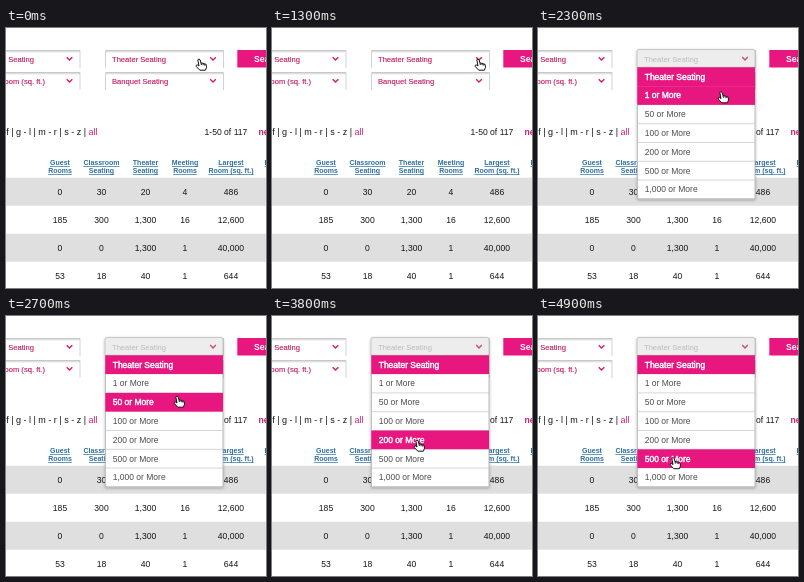
Write an HTML page that moves like this. It is 260x260 px and loops after 5000 ms.

```html
<!DOCTYPE html>
<html lang="en">
<head>
<meta charset="utf-8">
<title>Seating filter</title>
<style>
  html, body { margin: 0; width: 100%; height: 100%; overflow: hidden; background: #fff; }
  svg { display: block; width: 100vw; height: 100vh; }
  text { font: 8.6px "Liberation Sans", Arial, sans-serif; fill: #151515; }
  .label { font-size: 7.6px; fill: #c4145f; stroke: #c4145f; stroke-width: .12px; }
  .dim { fill: #bbb; stroke: none; }
  .head { font-size: 7px; font-weight: bold; fill: #2d6f9f; text-decoration: underline; }
  .mid { text-anchor: middle; }
  .end { text-anchor: end; }
  .item { font-size: 8.5px; fill: #4c4c4c; }
  .on { fill: #fff; stroke: #fff; stroke-width: .45px; }
  .strong { font-weight: bold; fill: #d51b73; }
  .go { font-weight: bold; fill: #fff; }
</style>
</head>
<body>
<svg id="stage" viewBox="0 0 260 260">
  <defs>
    <linearGradient id="inset" x2="0" y2="1">
      <stop stop-color="#bdbdbd"/><stop offset="1" stop-color="#fff"/>
    </linearGradient>
    <filter id="shade" x="-10%" y="-10%" width="120%" height="125%">
      <feDropShadow dx="0" dy="1" stdDeviation="1.5" flood-opacity=".3"/>
    </filter>
  </defs>
  <rect width="260" height="260" fill="#fff"/>
  <g id="page"></g>
  <g id="menu"></g>
  <g id="cursor" stroke-linejoin="round">
    <path id="hand" fill="#fff" stroke="#111" stroke-width="1"
      d="M-1.2 .8Q0-.8 1.1.8L2 4.2Q3.2 3.4 3.9 4.5Q5.2 3.8 5.7 5Q7.2 4.6 7.3 6.2L7.5 8.3L6.4 11.2H.8L-2.8 7.4Q-3.2 5.8-1.6 5.9L0 7Z M2 4.2L2.4 6 M3.9 4.5L4.3 6.2 M5.7 5L5.9 6.6"/>
    <path id="arrow" fill="#222" stroke="#fff" stroke-width=".7"
      d="M0 0V9.2L2.2 7.2L3.9 10.6L5.6 9.8L4 6.6H6.8Z"/>
  </g>
</svg>
<script>
const $ = id => document.getElementById(id);
const text = (x, y, s, cls = '') => `<text x="${x}" y="${y}" class="${cls}">${s}</text>`;
const rect = (x, y, w, h, fill, more = '') =>
  `<rect x="${x}" y="${y}" width="${w}" height="${h}" fill="${fill}" ${more}/>`;
const line = (d, color, width = .8) =>
  `<path d="${d}" fill="none" stroke="${color}" stroke-width="${width}"/>`;
const chevron = (x, y, color) => line(`M${x - 2.8} ${y - 1.4}l2.8 2.8l2.8-2.8`, color, 1.4);
const pink = '#e8177f', grey = '#dfdfdf';

const select = (x, y, tx, label, cls = '') =>
  rect(x, y - .5, 118, 3, 'url(#inset)') +
  line(`M${x} ${y}V${y + 17.5}M${x + 118} ${y}V${y + 17.5}`, '#c8c8c8') +
  text(tx, y + 11.2, label, 'label ' + cls) + chevron(x + 107.5, y + 8.2, '#d51b73');

const columns = [
  [54, 'Guest', 'Rooms', '0', '185', '0', '53'],
  [95.5, 'Classroom', 'Seating', '30', '300', '0', '18'],
  [139.5, 'Theater', 'Seating', '20', '1,300', '1,300', '40'],
  [179, 'Meeting', 'Rooms', '4', '16', '1', '1'],
  [225, 'Largest', 'Room (sq. ft.)', '486', '12,600', '40,000', '644']
];

let page = select(-44, 22.5, 28, 'Classroom Seating', 'end') +
  select(-44, 44.5, 39, 'Meeting Room (sq. ft.)', 'end') +
  select(99.5, 22.5, 106, 'Theater Seating') +
  select(99.5, 44.5, 106, 'Banquet Seating') +
  rect(231.3, 22, 40, 17.5, pink) + text(248, 34, 'Search', 'go') +
  '<text x=".2" y="107.2" style="font-size:9px">f | g - l | m - r | s - z | <tspan fill="#d51b73">all</tspan></text>' +
  text(198.5, 106.5, '1-50 of 117') + text(252.5, 106.5, 'next', 'strong') +
  rect(0, 149.7, 260, 28, grey) + rect(0, 205.7, 260, 28, grey);
for (const [x, top, low, ...values] of columns) {
  page += text(x, 137.2, top, 'head mid') + text(x, 145.2, low, 'head mid');
  values.forEach((v, i) => page += text(x, 166.6 + 28 * i, v, 'mid'));
}
page += text(258.5, 137.2, 'Exhibit', 'head');
$('page').innerHTML = page;

const items = ['Theater Seating', ...['1', '50', '100', '200', '500', '1,000'].map(n => n + ' or More')];
const rowTop = 39.3, rowH = 18.8;
const menuFor = hot => {
  let s = `<g filter="url(#shade)">` +
    rect(99, 21.5, 118, 19, '#ededed', 'rx="2" stroke="#bdbdbd" stroke-width=".8"') +
    rect(99.3, rowTop, 117.7, rowH * 7, '#fff', 'stroke="#aaa" stroke-width=".8"') + '</g>' +
    text(106, 33.7, 'Theater Seating', 'label dim') + chevron(207, 30.5, '#c64a80');
  items.forEach((label, i) => {
    const y = rowTop + i * rowH, on = !i || i === hot;
    s += on ? rect(99.3, y, 117.7, rowH, pink) : line(`M99.5 ${y + rowH}H217`, '#c4c4c4', .7);
    s += text(106.7, y + 12.2, label, on ? 'item on' : 'item');
  });
  return s;
};

// time, x, y of the pointer tip: rest on the chevron, then a steady glide down the list
const path = [
  [0, 193, 31], [800, 206, 31], [1500, 206, 31], [1700, 201, 39], [2700, 171, 80],
  [3300, 156, 104], [3800, 145, 124], [4300, 135, 141.5], [5000, 135, 141.5]
];
const pointer = t => {
  const i = path.findIndex(p => p[0] > t), [t0, x0, y0] = path[i - 1], [t1, x1, y1] = path[i];
  const k = (t - t0) / (t1 - t0);
  return [x0 + (x1 - x0) * k, y0 + (y1 - y0) * k];
};

let shown;
function draw(now) {
  const t = Math.floor(now % 5000 / 100) * 100;
  if (t === shown) return;
  shown = t;
  const [x, y] = pointer(t), open = t >= 1500, arrow = open && y < rowTop;
  $('menu').innerHTML = open ? menuFor(Math.floor((y - rowTop) / rowH)) : '';
  $('cursor').setAttribute('transform', `translate(${x} ${y})`);
  $('hand').style.display = arrow ? 'none' : '';
  $('arrow').style.display = arrow ? '' : 'none';
}
const start = performance.now();
function tick() {
  draw(performance.now() - start);
  requestAnimationFrame(tick);
}
tick();
</script>
</body>
</html>
```
